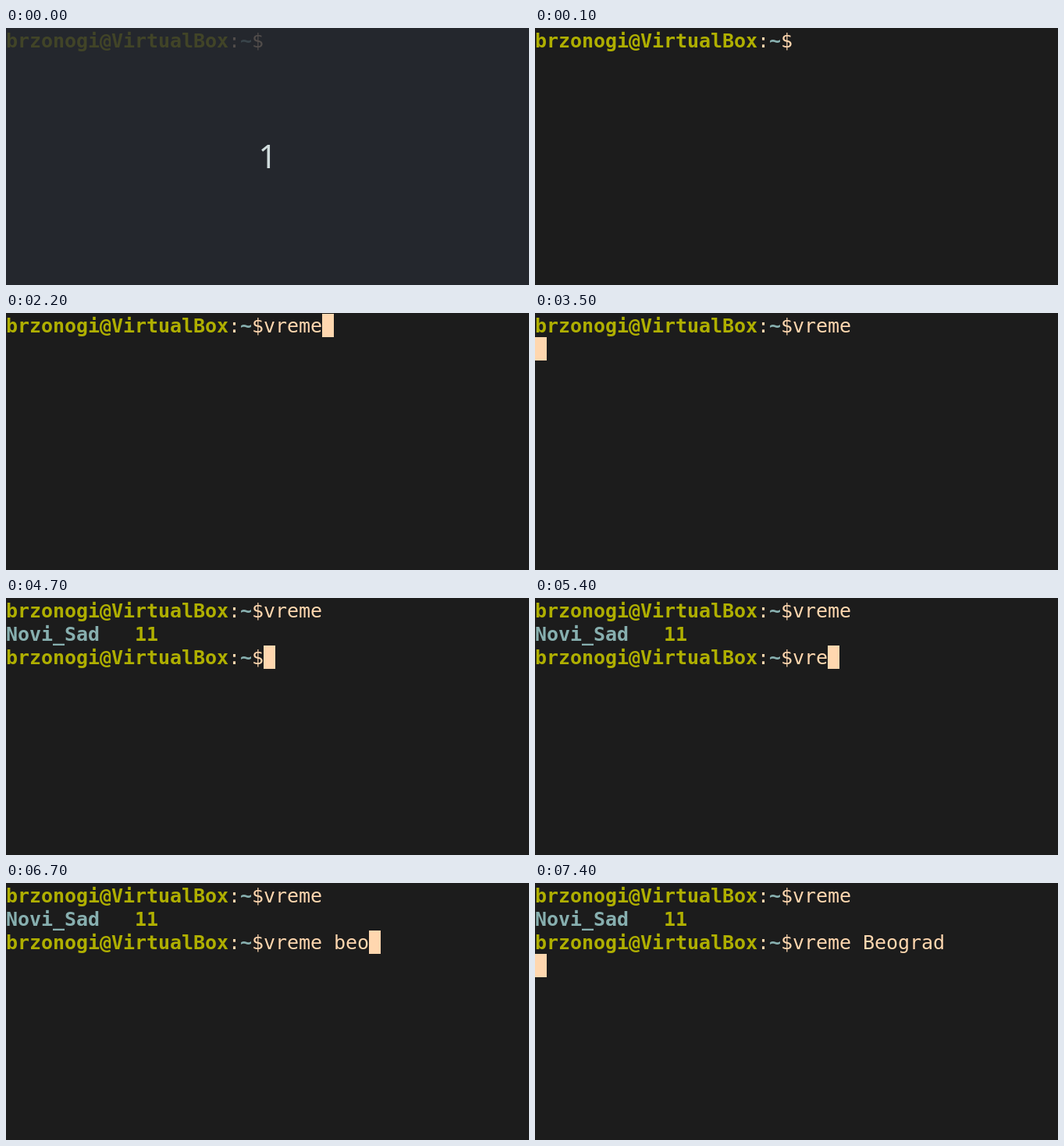
Write an HTML page with a canvas that moves like this. It is 670x330 px and loops after 8 s.

```html
<!DOCTYPE html>
<html lang="sr">
<head>
<meta charset="utf-8">
<title>Terminal</title>
<style>
  html, body { margin: 0; height: 100%; overflow: hidden; background: #1c1c1c; }
  canvas { display: block; }
</style>
</head>
<body>
<canvas id="screen" width="670" height="330"></canvas>
<script>
const ctx = document.getElementById('screen').getContext('2d');
const DURATION = 8000, TITLE_END = 100;
const CELL_W = 15, CELL_H = 30, TOP = 1, BASELINE = 25;
const BACK = '#1c1c1c', CREAM = '#ffd7af', OLIVE = '#afaf00', TEAL = '#87afaf';
const PROMPT_COLS = 22;

// Each entry: start time, first command, second command (null before its prompt), cursor on
const steps = [
  [0, '', null, false],
  [700, '', null, true],
  [1200, '', null, false],
  [1400, 'v', null, true],
  [1600, 'vr', null, true],
  [1700, 'vre', null, true],
  [2000, 'vrem', null, true],
  [2200, 'vreme', null, true],
  [2400, 'vreme\n', null, true],
  [2900, 'vreme\n', null, false],
  [3500, 'vreme\n', null, true],
  [4100, 'vreme\n', null, false],
  [4200, 'vreme\n', '', false],
  [4700, 'vreme\n', '', true],
  [5000, 'vreme\n', 'v', true],
  [5300, 'vreme\n', 'vr', true],
  [5400, 'vreme\n', 'vre', true],
  [5600, 'vreme\n', 'vrem', true],
  [5700, 'vreme\n', 'vreme', true],
  [5900, 'vreme\n', 'vreme ', true],
  [6400, 'vreme\n', 'vreme b', true],
  [6600, 'vreme\n', 'vreme be', true],
  [6700, 'vreme\n', 'vreme beo', true],
  [7000, 'vreme\n', 'vreme Beograd ', true],
  [7400, 'vreme\n', 'vreme Beograd \n', true],
];

function write(text, col, row, color, weight = 'normal') {
  ctx.font = `${weight} 25px "DejaVu Sans Mono", monospace`;
  ctx.fillStyle = color;
  [...text].forEach((char, i) =>
    ctx.fillText(char, (col + i) * CELL_W, row * CELL_H + BASELINE));
}

function drawCommand(row, command) {
  write('brzonogi@VirtualBox', 0, row, OLIVE, 'bold');
  write(':', 19, row, CREAM);
  write('~', 20, row, TEAL, 'bold');
  write('$' + command.trimEnd(), 21, row, CREAM);
}

function drawCursor(row, command) {
  const entered = command.endsWith('\n');
  const col = entered ? 0 : PROMPT_COLS + command.length;
  ctx.fillStyle = CREAM;
  ctx.fillRect(col * CELL_W, TOP + (row + entered) * CELL_H, CELL_W, CELL_H);
}

function drawTitle() {
  ctx.fillStyle = 'rgba(38, 42, 49, 0.8)';
  ctx.fillRect(0, 0, 670, 330);
  ctx.font = '41px "Noto Sans", sans-serif';
  ctx.fillStyle = '#d0dcdc';
  ctx.fillText('1', 323.5, 180);
}

function draw(time) {
  const [, first, second, cursorOn] = steps.findLast(([start]) => start <= time);
  ctx.fillStyle = BACK;
  ctx.fillRect(0, 0, 670, 330);
  drawCommand(0, first);
  if (second !== null) {
    write('Novi_Sad', 0, 1, TEAL, 'bold');
    write('11', 11, 1, OLIVE, 'bold');
    drawCommand(2, second);
  }
  if (cursorOn) drawCursor(second === null ? 0 : 2, second ?? first);
  if (time < TITLE_END) drawTitle();
}

const begin = performance.now();
function tick() {
  draw((performance.now() - begin) % DURATION);
  requestAnimationFrame(tick);
}
tick();
</script>
</body>
</html>
```
